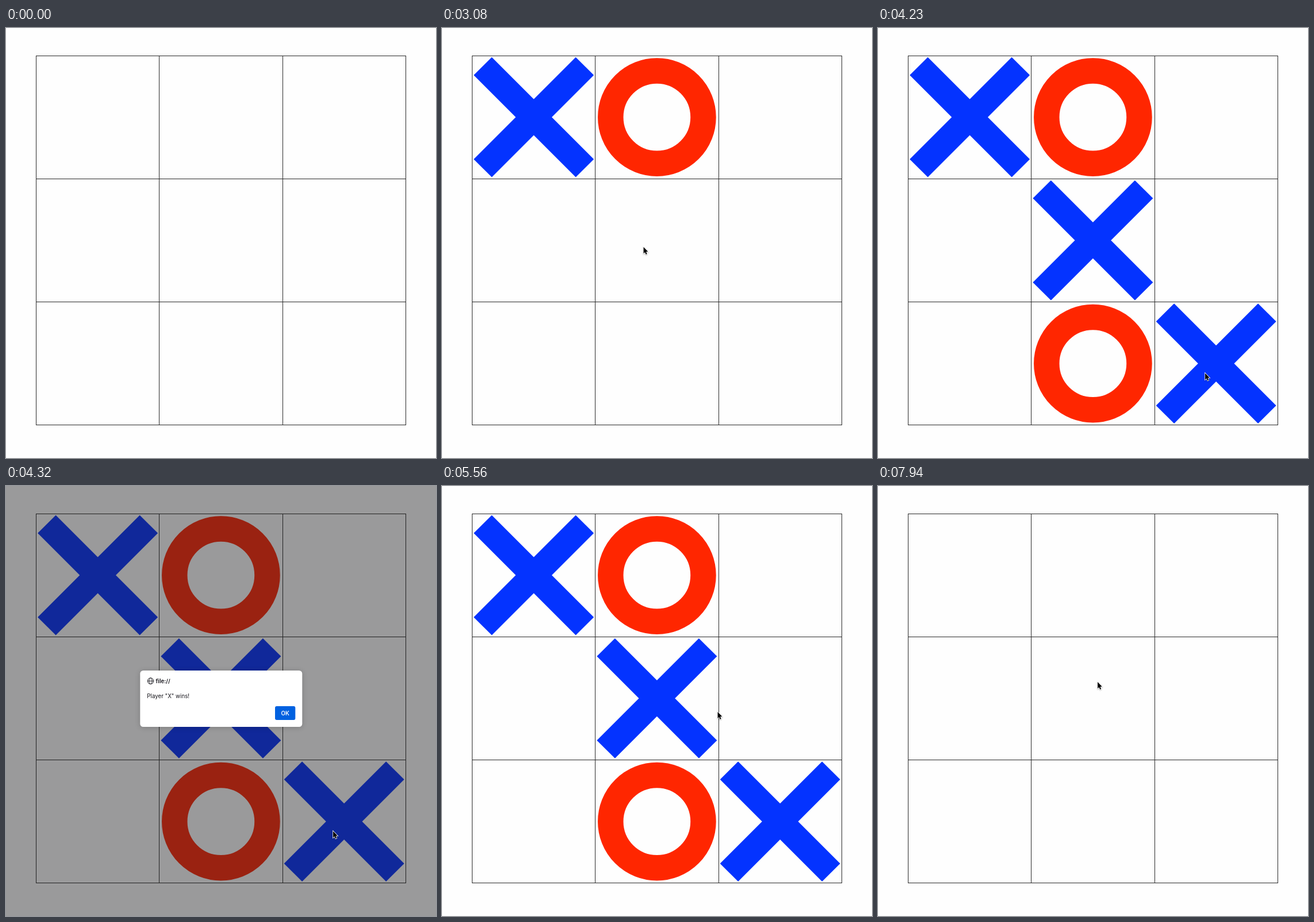
An HTML page with a canvas for the animation above (8 s loop, 748 by 748 pixels).

```html
<!DOCTYPE html>
<html lang="en">
<head>
<meta charset="utf-8">
<title>Tic-tac-toe</title>
<style>
html, body { margin: 0; height: 100%; overflow: hidden; background: #fefefe; }
canvas { display: block; }
</style>
</head>
<body>
<canvas id="stage" width="748" height="748"></canvas>
<script>
const ctx = document.getElementById('stage').getContext('2d');
const LOOP = 8000, START = 618, TICK = 87.8;
const LEFT = 52.5, TOP = 48, CELL = 214.25;

const LIGHT = { page: '#fefefe', line: '#2a2a2a', marks: ['#0433ff', '#ff2600'] };
const DIMMED = { page: '#9a9a9b', line: '#222', marks: ['#10289a', '#9a2211'] };

const ENTRY = [398, 242];
const TURNS = [
  { from: 0, to: 6, at: [186, 188], click: 14 },
  { from: 16, to: 21, at: [390, 200], click: 22 },
  { from: 24, to: 28, at: [350, 381], click: 29, via: [120, 320] },
  { from: 31, to: 35, at: [388, 594], click: 36 },
  { from: 37, to: 40, at: [568.5, 600.5], click: 41 }
];
const CONFIRM = { from: 45, to: 52, at: [479, 393], click: 55, via: [440, 440] };
const STROKES = [...TURNS, CONFIRM,
  { from: 59, to: 68, at: [374, 372], click: 69, via: [430, 425] },
  { from: 74, to: 83, at: [381.5, 341], via: [-94, 400] }
];
const ALERT = TURNS[4].click + 1, CLOSE = CONFIRM.click + 1, RESET = STROKES[6].click;

const ease = u => u * u * (3 - 2 * u);

function pointerAt(k) {
  let pos = ENTRY;
  for (const { from, to, at, via } of STROKES) {
    if (k < from) break;
    const start = pos, u = ease(Math.min(1, (k - from + 1) / (to - from + 1)));
    pos = at.map((end, i) => {
      const mid = via ? via[i] : (start[i] + end) / 2;
      return start[i] * (1 - u) ** 2 + 2 * mid * u * (1 - u) + end * u * u;
    });
  }
  return pos;
}

function drawGrid(color) {
  ctx.fillStyle = color;
  for (let i = 0; i < 4; i++) {
    ctx.fillRect(Math.floor(LEFT + i * CELL), TOP, 1, 643);
    ctx.fillRect(52, Math.floor(TOP + i * CELL), 644, 1);
  }
}

// Draws the mark in the clicked cell; X and O take turns.
function drawMark(turn, { at }, color) {
  const center = (v, edge) => edge + (Math.floor((v - edge) / CELL) + 0.5) * CELL;
  const x = center(at[0], LEFT), y = center(at[1], TOP), r = 88.75;
  ctx.beginPath();
  if (turn % 2) {
    ctx.arc(x, y, 80.6, 0, Math.PI * 2);
  } else {
    for (const s of [-1, 1]) {
      ctx.moveTo(x - r, y - r * s);
      ctx.lineTo(x + r, y + r * s);
    }
  }
  ctx.lineWidth = 44.5;
  ctx.strokeStyle = color;
  ctx.stroke();
}

function box(x, y, w, h, r, color) {
  ctx.beginPath();
  ctx.roundRect(x, y, w, h, r);
  ctx.fillStyle = color;
  ctx.fill();
}

function label(text, x, y, weight, color) {
  ctx.font = weight + ' 9.75px Inter, sans-serif';
  ctx.fillStyle = color;
  ctx.fillText(text, x, y);
}

function drawGlobe(x, y, r) {
  ctx.beginPath();
  ctx.arc(x, y, r, 0, Math.PI * 2);
  ctx.moveTo(x + r / 2, y);
  ctx.ellipse(x, y, r / 2, r, 0, 0, Math.PI * 2);
  ctx.moveTo(x - r, y);
  ctx.lineTo(x + r, y);
  ctx.lineWidth = 0.9;
  ctx.strokeStyle = '#15141a';
  ctx.stroke();
}

function drawDialog(k) {
  ctx.save();
  ctx.shadowColor = 'rgba(0,0,0,.2)';
  ctx.shadowBlur = 10;
  ctx.shadowOffsetY = 1;
  box(233.3, 321, 282, 98, 5.5, '#fff');
  ctx.restore();
  drawGlobe(251.5, 339.2, 5.3);
  label('file://', 260.5, 342.6, 600, '#15141a');
  label('Player "X" wins!', 245.3, 369, 400, '#15141a');
  box(468, 383, 35.3, 24, 3, k >= CONFIRM.click ? '#054096' : k >= CONFIRM.to ? '#0250bb' : '#0061e0');
  label('OK', 478.5, 398.7, 600, '#fff');
}

function drawPointer([x, y]) {
  ctx.save();
  ctx.translate(x + 0.6, y);
  const arrow = new Path2D('M0 0V11.2L2.5 8.9 4.2 12.9 6 12.1 4.4 8.3 7.7 8.1Z');
  ctx.shadowColor = 'rgba(0,0,0,.3)';
  ctx.shadowBlur = 2;
  ctx.shadowOffsetY = 1;
  ctx.lineWidth = 1.6;
  ctx.strokeStyle = '#fff';
  ctx.stroke(arrow);
  ctx.shadowColor = 'transparent';
  ctx.fillStyle = '#000';
  ctx.fill(arrow);
  ctx.restore();
}

function draw(t) {
  const k = Math.floor((t - START) / TICK);
  const open = k >= ALERT && k < CLOSE;
  const theme = open ? DIMMED : LIGHT;
  ctx.fillStyle = theme.page;
  ctx.fillRect(0, 0, 748, 748);
  TURNS.forEach((turn, i) => {
    if (k >= turn.click && k < RESET) drawMark(i, turn, theme.marks[i % 2]);
  });
  drawGrid(theme.line);
  if (open) drawDialog(k);
  if (k >= 0) drawPointer(pointerAt(k));
}

function loop() {
  draw(performance.now() % LOOP);
  requestAnimationFrame(loop);
}
loop();
</script>
</body>
</html>
```
